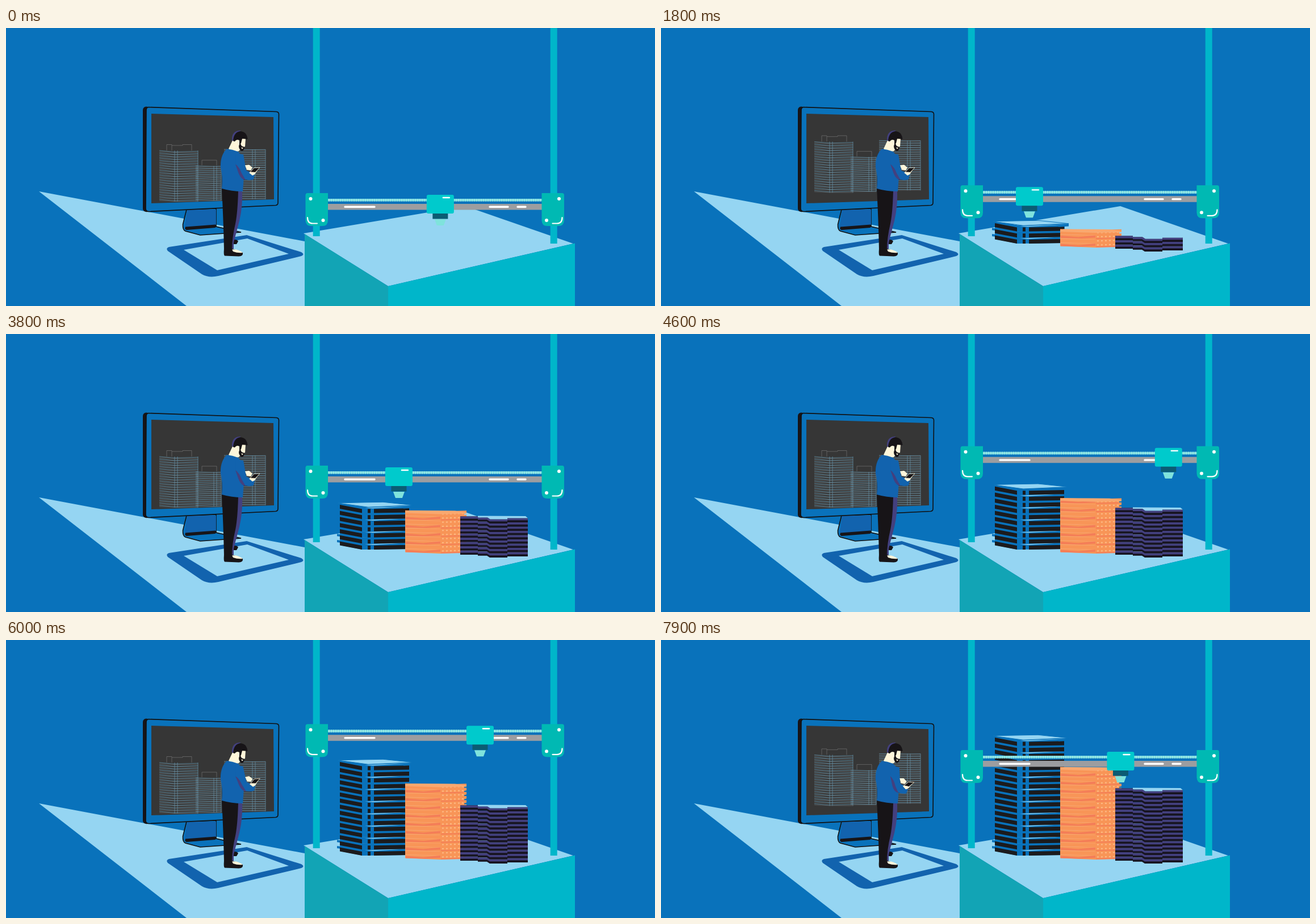
An HTML page that plays this animation: 1143 by 490 pixels, repeating every 8 s.

```html
<!DOCTYPE html>
<html lang="en">
<head>
<meta charset="utf-8">
<title>Printing a skyline</title>
<style>
  html, body { margin: 0; width: 100%; height: 100%; overflow: hidden; background: #0972bb; }
  svg { display: block; width: 100%; height: 100%; }
  .sky { fill: #0972bb; }
  .pale { fill: #95d5f2; }
  .navy { fill: #1263ae; }
  .ink { fill: #171417; }
  .plum { fill: #43407f; }
  .skin { fill: #fff6da; }
  .teal { fill: #00b6ca; }
  .pill { stroke: #fff; stroke-linecap: round; fill: none; }
</style>
</head>
<body>
<svg viewBox="0 0 1143 490" preserveAspectRatio="none">
  <defs>
    <clipPath id="screen"><path d="M256 151L471 157L472 302L256 309Z"/></clipPath>

    <g id="blueFloor">
      <path class="sky" d="M588 372L628 380L705 379H711V367L628 369L588 361Z"/>
      <path class="sky" d="M583 363L630 370L712 367V371L632 374L583 367Z"/>
      <path fill="#1b1b1d" d="M588 365.500L627 373V380L588 372.500ZM637 373H642V380H637ZM648 373L710 371.700V379L648 380Z"/>
    </g>
    <g id="blueTrim">
      <path class="sky" d="M700 368L718 366.500V371L700 372Z"/>
      <path class="pale" d="M632 370.800L714 367.800L646 371.800Z"/>
    </g>
    <path id="blueRoof" class="pale" stroke="#0972bb" d="M583 373L664 371.500L718 377L638 380.500Z"/>

    <g id="orangeFloor">
      <path fill="#f89557" d="M703 376L765 378L811 376.500V381L807 382V386L765 387L703 384.500Z"/>
      <path stroke="#fdb884" stroke-width="2.200" stroke-dasharray="3 4" d="M768 382.500L806 381.500"/>
      <path stroke="#f8a873" d="M703 378.500L765 379.800"/>
    </g>
    <path id="orangeTrim" fill="#f47d58" d="M704 384.500V380.500L735 383L765 380V384L740 385.500ZM766 386.500L806 385.500V383.800L766 384.800Z"/>
    <path id="orangeRoof" fill="#f9a86f" d="M703 385.500L709 383.500L790 384L811 386.500V389L765 390L703 388Z"/>

    <g id="plumFloor">
      <path fill="#171420" d="M800 381.500H831V383.500H848L853 386.500H882V384.500H919V392H883V394H852L847 390.800H831V389H800Z"/>
      <path class="plum" d="M800 381.500H831V383.500H848L853 386.500H882V384.500H919V388.300H883V390.300H852L847 387.300H831V385.500H800Z"/>
    </g>
    <path id="plumTrim" stroke="#95d5f2" stroke-width=".5" fill="none" d="M832 383.200H848L853 386.200"/>
    <path id="plumRoof" class="pale" d="M831 388L915 388.500L919 392H883V394H853L848 390.500H831Z"/>
  </defs>

  <rect class="sky" width="1143" height="490"/>
  <path class="pale" d="M58 288L526 376V490H318Z"/>

  <!-- monitor -->
  <path class="sky" stroke="#111" stroke-width="1.600" d="M318 320L311.500 346Q311 356 316 358L342 365L414 360L370 350V318Z"/>
  <path class="navy" d="M319 320H370V347L315 351Z"/>
  <path class="ink" d="M316 350.500L369 346.500Q372 350 368 352L318 356Q314 355 316 350.500Z"/>
  <path class="ink" d="M247 138.500Q241 139 241 145V319Q242 325 250 324L256 140Z"/>
  <path class="sky" stroke="#111" stroke-width="1.600" d="M251 139.500L476 147.500Q480.500 148 480.500 152L479 308Q479 312 475 312.500L251 323.500Q246 323 246 318L247 145Q247 140 251 139.500Z"/>
  <path fill="#363636" d="M256 151L471 157L472 302L256 309Z"/>
  <g clip-path="url(#screen)"><g id="wire" fill="none" stroke-width=".65"></g></g>

  <!-- floor frame -->
  <path class="navy" d="M287 386L424 365L520 395Q527 399 520 402L374 437Q357 441 345 434L285 393Q281 388 287 386Z"/>
  <path class="pale" d="M313 391L425 371L498 398L372 427Z"/>

  <!-- man -->
  <path class="ink" d="M398 374Q406 371 409 376L406 381H397Z"/>
  <path class="plum" d="M407 285L416 287Q417 315 411 340L401 378V389H396Z"/>
  <path class="ink" d="M380 282L409 287Q408 325 404 345Q398 370 398 391H384Q383 340 380 282Z"/>
  <path class="ink" d="M384 389H399L417 396Q418 402 410 402.500L385 401.500Q383 400 384 389Z"/>
  <path class="skin" d="M398 390.500Q408 389 417 396Q408 397 400 394Z"/>
  <path class="skin" d="M400 196L392 213Q400 220 410 217L414 212L421 209L422 195Z"/>
  <path class="navy" d="M389 213Q399 214 409 218Q417 225 417 240L419 262L417 288Q397 288 380 283Q382 262 378 246Q377 224 389 213Z"/>
  <path class="plum" d="M398 198Q397 181 413 180.500L408 192L402 200Z"/>
  <path class="ink" d="M400 199Q401 184 412 182Q424 182 425.500 196L416 195L414 203L411 206L411 198Q406 195 403 200Z"/>
  <path class="ink" d="M412 202L415 208L420 210Q419 217 415 217Q410 214 410 208Z"/>
  <path class="skin" d="M414 210.500L418 211L416 213.500Z"/>
  <g id="arm">
    <path class="navy" d="M405 221L418 223L423 251L438 258L436 267Q425 270 416 265Q407 252 404 240Z"/>
    <path class="plum" d="M404 240Q411 245 415 256L422 268Q414 267 410 257Z"/>
    <path class="skin" d="M421 242L428 241L434 246L431 251L424 250Z"/>
    <path class="skin" d="M428 255L435 252L444 249L438 258L434 260Z"/>
    <path class="ink" stroke="#fff6da" stroke-width=".8" d="M430 254L437 246.500L447 246L439 254.500Z"/>
  </g>

  <!-- print bed -->
  <path class="pale" d="M524 362L809 314L999 380L673 455Z"/>
  <path fill="#12a4b5" d="M526 363L673 455V490H526Z"/>
  <path class="teal" d="M673 455L1002 379.500V490H673Z"/>

  <g id="blue"></g>
  <g id="orange"></g>
  <g id="plum"></g>

  <!-- printer -->
  <path class="teal" d="M540.700 0H552.700V367H540.700ZM958.700 0H970.700V380H958.700Z"/>
  <g id="rig">
    <path fill="#79dce2" d="M560 301H950V305.500H560Z"/>
    <path stroke="#97e6e2" stroke-width="4.500" stroke-dasharray="2 2" d="M560 303.200H950"/>
    <path fill="#9c9da0" d="M560 310H950V320.500H560Z"/>
    <path class="pill" stroke-width="3.400" d="M597 315.300H649M852 315.300H884M901 315.300H915"/>
    <g id="head">
      <path fill="#7fe3dc" d="M-10 337H10L6 348H-6Z"/>
      <path fill="#0b5c73" d="M-13.500 326H13.500V336.500H-13.500Z"/>
      <rect x="-24" y="294" width="48" height="33" rx="3" fill="#00cacc"/>
      <path class="pill" stroke-width="2.400" d="M5 299H16"/>
    </g>
    <g id="bracket">
      <path fill="#00b9b3" d="M531 291H567V339Q567 349 557 349H538Q527.500 349 527.500 339V295Q527.500 291 531 291Z"/>
      <circle cx="536.500" cy="301" r="3" fill="#fff"/>
      <circle cx="558.500" cy="339" r="3" fill="#fff"/>
      <path class="pill" stroke-width="2.200" d="M531 334Q531 344.500 540 344.500H548"/>
    </g>
    <use href="#bracket" transform="matrix(-1 0 0 1 1510.500 0)"/>
  </g>
</svg>

<script>
const LOOP = 8000, STEP = 100, TAU = 2 * Math.PI;
const $ = id => document.getElementById(id);

// Linear interpolation through [time, value] pairs.
const along = (...keys) => t => {
  const next = keys.findIndex(([time]) => time > t);
  if (next < 1) return keys.at(next)[1];
  const [t0, a] = keys[next - 1], [t1, b] = keys[next];
  return a + (b - a) * (t - t0) / (t1 - t0);
};

// Whole numbers are visits of the print head to its left stop.
const sweeps = along([0, 0.265], [2700, 3], [5300, 5], [7900, 7.333]);
const headX = t => {
  const phase = sweeps(t) % 1;
  return 591 + 328 * (1 - Math.abs(2 * phase - 1));
};
const rigY = along([1000, 291], [2700, 262], [3800, 232], [5300, 168], [6900, 123], [7900, 194]);

const wireY = t => {
  const u = t % 6600 / 2100;
  return u < 1 ? 20 * Math.sin(TAU * u) : 0;
};
const armAngle = t => {
  const u = Math.max(0, (t - 4500) / 4200);
  return -9.5 * u * Math.sin(TAU * u);
};

function buildTower(name, count, pitch, trimEvery, height) {
  const use = (part, k) => `<use href="#${name}${part}" y="${-k * pitch}"/>`;
  let markup = '';
  for (let k = 0; k < count; k++) {
    markup += `<g>${use('Floor', k)}${k % trimEvery ? '' : use('Trim', k)}</g>`;
  }
  const group = $(name);
  group.innerHTML = markup + use('Roof', 0);
  const floors = [...group.children], roof = floors.pop();
  return t => {
    const n = Math.round(height(t));
    floors.forEach((floor, k) => floor.style.display = k < n ? '' : 'none');
    roof.style.display = n ? '' : 'none';
    roof.setAttribute('y', -n * pitch);
  };
}

// One wireframe block: slanted slabs left of the corner, flatter ones right of it.
function wireBlock(left, corner, right, top, bottom, pitch, slant) {
  let slabs = '', shades = '';
  for (let y = top; y < bottom; y += pitch) {
    slabs += `M${left} ${y}L${corner} ${y + slant}L${right} ${y + slant / 2}`;
    shades += `M${left} ${y + pitch / 2}L${corner} ${y + slant + 1}H${right}`;
  }
  const posts = [corner, corner + 5, right].map(x => `M${x} ${top}V${bottom}`).join('');
  return `<path stroke="#6ba3bd" d="${slabs + posts}"/><path stroke="#6b7276" d="${shades}"/>`;
}

$('wire').innerHTML =
  wireBlock(270, 297, 338, 216, 306, 4.3, 2.5) +
  wireBlock(334, 366, 379, 243, 304, 3.7, 1) +
  wireBlock(384, 434, 457, 214, 302, 3.9, 0.5) +
  '<path stroke="#777" d="M283 216V205.500H292V207H311V205.500H327V216M292 207V216M345 242V233H371V242"/>';

const towers = [
  buildTower('blue', 19, 10.75, 2, along([0, 0], [2700, 5], [3800, 7], [5300, 13], [7200, 19])),
  buildTower('orange', 22, 7.25, 2, along([0, 0], [2700, 6], [6600, 20], [7200, 22])),
  buildTower('plum', 17, 7.5, 4, along([0, 0], [2700, 4.4], [3600, 8.6], [7900, 17]))
];

function frame(now) {
  const t = Math.floor(now % LOOP / STEP) * STEP;
  towers.forEach(show => show(t));
  $('rig').setAttribute('transform', `translate(0 ${rigY(t) - 291})`);
  $('head').setAttribute('transform', `translate(${headX(t)} 0)`);
  $('wire').setAttribute('transform', `translate(0 ${wireY(t)})`);
  $('arm').setAttribute('transform', `rotate(${armAngle(t)} 406 238)`);
  requestAnimationFrame(frame);
}
frame(performance.now());
</script>
</body>
</html>
```
